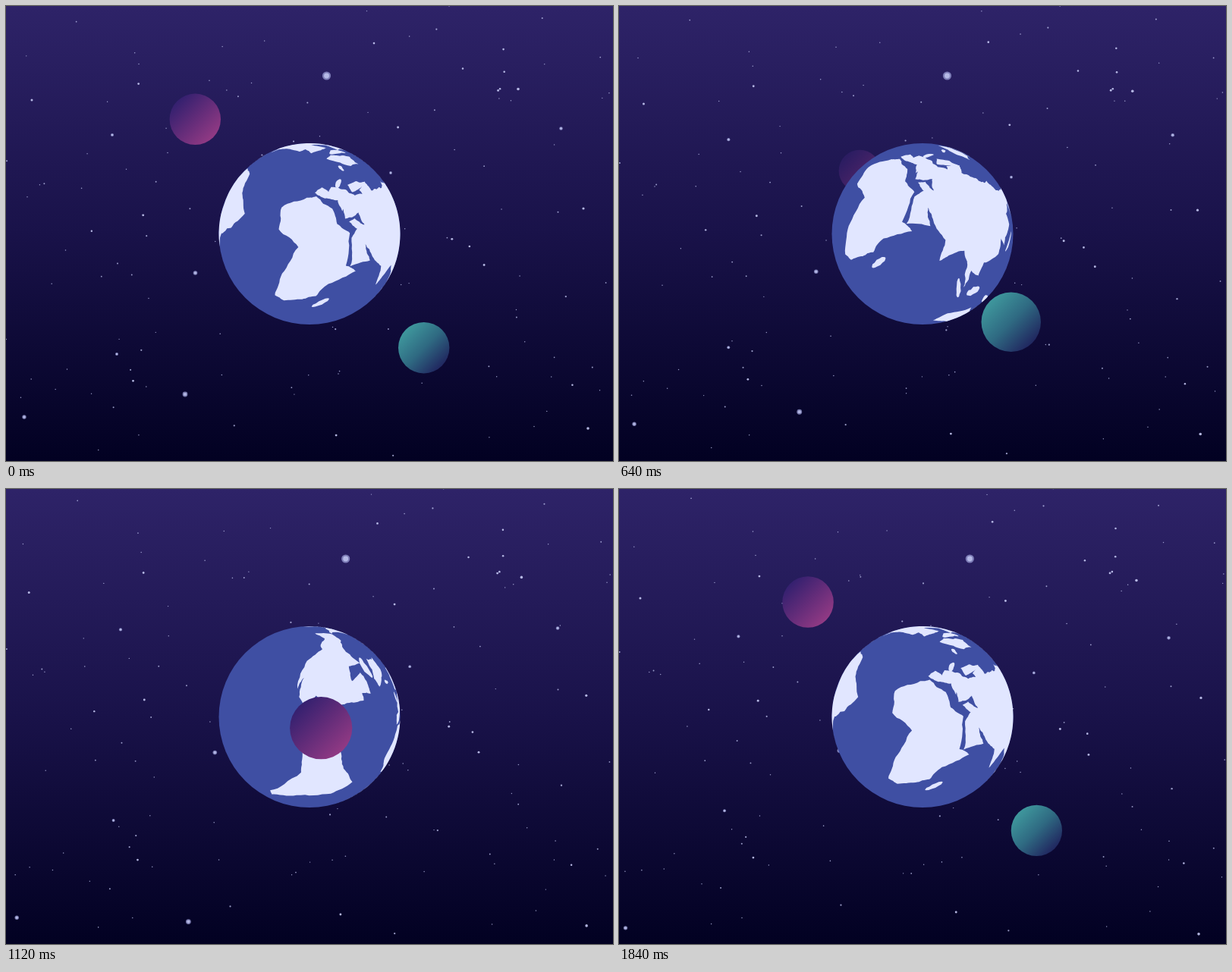
Animation, 800 px wide and 600 px high, one loop 1920 ms. Source, as an HTML page with a canvas:

```html
<!DOCTYPE html>
<html lang="en">
<head>
<meta charset="utf-8">
<title>Planet in orbit</title>
<style>
html, body { margin: 0; width: 100%; height: 100%; overflow: hidden; background: #020122; }
canvas { display: block; }
</style>
</head>
<body>
<canvas id="stage" width="800" height="600"></canvas>
<script>
const ctx = document.getElementById('stage').getContext('2d');
const LOOP = 1920, STEP = 80, CX = 400, CY = 300.5, R = 119.5;
const rad = d => d * Math.PI / 180;
const LEAN = rad(15), ROLL = rad(40), START_LON = 9;

let seed = 7;
const random = () => (seed = seed * 16807 % 2147483647) / 2147483647;
const spread = size => (random() - 0.5) * size;

// Splits an edge again and again, nudging each middle sideways for a ragged coast
function ragged(a, b, level, out) {
  if (!level) return out.push(a);
  const dx = b[0] - a[0], dy = b[1] - a[1], n = spread(0.16) * Math.min(1, 12 / Math.hypot(dx, dy));
  const mid = [(a[0] + b[0]) / 2 - dy * n, (a[1] + b[1]) / 2 + dx * n];
  ragged(a, mid, level - 1, out);
  ragged(mid, b, level - 1, out);
}

const lands = [];

// Corner points as longitude, latitude pairs
function land(...c) {
  const out = [], at = i => c.slice(i % c.length, i % c.length + 2);
  for (let i = 0; i < c.length; i += 2) ragged(at(i), at(i + 2), 3, out);
  lands.push(out);
}

// Centre, half length, half width, tilt
function island(lon, lat, len, wid, tilt) {
  const out = [], cos = Math.cos(rad(tilt)), sin = Math.sin(rad(tilt)), stretch = Math.cos(rad(lat));
  for (let i = 0; i < 16; i++) {
    const u = Math.cos(i * Math.PI / 8) * len, v = Math.sin(i * Math.PI / 8) * wid * (1 + spread(0.5));
    out.push([lon + (u * cos - v * sin) / stretch, lat + u * sin + v * cos]);
  }
  lands.push(out);
}

// Africa
land(-6,36, 10,37, 20,31, 32,31, 42,12, 51,12, 40,-4, 40,-16, 35,-24, 27,-34, 19,-35, 12,-17, 9,4, -8,4, -17,15, -10,31);
// Europe and Asia
land(-9,37, -9,43, -2,44, -4,48, 8,54, 20,55, 28,60, 22,61, 24,66, 16,56, 6,58, 12,66, 26,71, 42,67, 72,73,
  104,77, 130,71, 190,66, 163,59, 157,51, 156,60, 136,55, 140,48, 128,40, 127,35, 121,39, 121,29, 108,21,
  109,12, 101,13, 104,1, 98,9, 94,17, 88,22, 80,14, 77,8, 72,21, 57,26, 48,30, 58,22, 45,13, 35,29, 36,36,
  27,37, 30,41, 41,41, 31,46, 28,41, 23,37, 13,45, 18,40, 9,44, 0,39);
// North America, Greenland
land(-168,66, -150,71, -115,68, -84,69, -94,60, -81,52, -77,62, -65,59, -56,52, -66,49, -62,45, -75,37, -81,31,
  -80,25, -84,30, -97,28, -95,18, -87,21, -83,10, -77,8, -85,11, -105,20, -113,31, -110,23, -124,40, -130,54,
  -150,60, -163,55);
land(-72,78, -33,83, -20,74, -42,60, -52,64, -55,71);
// South America
land(-77,8, -62,10, -50,0, -35,-6, -40,-21, -57,-37, -68,-54, -74,-50, -71,-18, -81,-5);
// Australia
land(114,-22, 130,-12, 140,-17, 142,-11, 153,-27, 148,-38, 131,-32, 115,-34);

island(47, -19, 6.5, 2, 75);
island(-2, 54, 4, 1.6, 110);
island(-19, 65, 2.6, 1.4, 0);
island(138, 37, 8, 1.2, 48);
island(114, 1, 5, 3.5, 45);
island(101, -1, 8, 1.5, -48);
island(141, -5, 10, 2.6, -25);
island(-73, 69, 8, 2.4, -38);
island(173, -41, 7, 1.2, 50);

// Bright stars: x, y, radius, drift x, drift y
const bright = [
  422.5,92,5.6,40,0, 236,512,3.4,7,93, 140,170,2.1,17.5,24.5, 24,542,2.7,-15.5,37, 34,124,1.5,-6,20,
  731.5,161.5,2.3,-7,35, 249.5,352,2.8,41,-7, 675,109.5,1.8,7,11, 507,220,1.9,40,22.5, 761,267,1.6,6,8.5,
  146,459,2,-7,-35, 767,557,1.8,-3,30];
const stars = [];
for (let i = 0; i < bright.length; i += 5) stars.push(bright.slice(i, i + 5));
for (let i = 0; i < 125; i++)
  stars.push([random() * 800, random() * 600, 0.7 + 0.8 * random() ** 3, spread(26), spread(26)]);

// cubic-bezier(x1, 0, x2, 1)
function ease(p, x1, x2) {
  let lo = 0, hi = 1;
  for (let i = 0; i < 24; i++) {
    const s = (lo + hi) / 2, q = 1 - s;
    if (3 * q * q * s * x1 + 3 * q * s * s * x2 + s * s * s < p) lo = s; else hi = s;
  }
  return lo * lo * (3 - 2 * lo);
}

function disc(x, y, r, fill, alpha = 1) {
  ctx.globalAlpha = alpha;
  ctx.fillStyle = fill;
  ctx.beginPath();
  ctx.arc(x, y, r, 0, 2 * Math.PI);
  ctx.fill();
  ctx.globalAlpha = 1;
}

function gradient(x0, y0, x1, y1, ...colors) {
  const g = ctx.createLinearGradient(x0, y0, x1, y1);
  colors.forEach((c, i) => g.addColorStop(i / (colors.length - 1), c));
  return g;
}

function drawStar([x, y, r, dx, dy], k) {
  x += dx * k;
  y += dy * k;
  if (r < 1.9) return disc(x, y, r, '#c6caf4', r < 1.2 ? 0.75 : 0.9);
  disc(x, y, r, '#9a9cd4', 0.75);
  disc(x, y, r * 0.62, '#c3c8f2', 0.8);
}

// Far-side points are pushed out to the rim
function project([lon, lat], lon0) {
  const d = rad(lon - lon0), f = rad(lat);
  const a = Math.cos(f) * Math.sin(d), b = Math.sin(f), c = Math.cos(f) * Math.cos(d);
  const y = b * Math.cos(LEAN) - c * Math.sin(LEAN);
  const z = b * Math.sin(LEAN) + c * Math.cos(LEAN);
  const k = z < 0 ? R / Math.hypot(a, y) : R;
  return {
    x: CX + k * (a * Math.cos(ROLL) + y * Math.sin(ROLL)),
    y: CY + k * (a * Math.sin(ROLL) - y * Math.cos(ROLL)),
    front: z > 0
  };
}

function drawLand(coast, lon0) {
  const points = coast.map(c => project(c, lon0));
  if (!points.some(p => p.front)) return;
  ctx.beginPath();
  points.forEach(p => ctx.lineTo(p.x, p.y));
  ctx.fill();
}

function drawGlobe(lon0) {
  disc(CX, CY, R, '#3f4fa3');
  ctx.fillStyle = '#e1e6ff';
  lands.forEach(coast => drawLand(coast, lon0));
}

// depth > 0 is nearer than the globe
function planet(angle, side, colors) {
  const depth = -side * Math.sin(angle);
  const scale = 1 + depth * (depth > 0 ? 0.22 : 0.25);
  const shift = -side * 150.7 * Math.cos(angle) * scale;
  return { depth, r: 33.7 * scale, x: CX + shift, y: CY - 0.5 + shift, colors };
}

function drawPlanet({ depth, r, x, y, colors }) {
  const e = r * 0.72;
  disc(x, y, r, gradient(x - e, y - e, x + e, y + e, ...colors), depth < 0 ? 1 - 0.9 * depth * depth : 1);
}

function draw(now) {
  const p = Math.floor(now % LOOP / STEP) * STEP / LOOP;
  const turn = ease(p, 0.69, 0.32);
  ctx.fillStyle = gradient(0, 0, 0, 600, '#2e2368', '#191249', '#020122');
  ctx.fillRect(0, 0, 800, 600);
  const drift = (1 - Math.cos(Math.PI * p)) / 2;
  stars.forEach(s => drawStar(s, drift));

  const planets = [
    planet(2 * Math.PI * ease(p, 0.7, 0.3), 1, ['#33206f', '#632c79', '#923a84']),
    planet(2 * Math.PI * turn, -1, ['#3f989d', '#2f6a82', '#20265f'])
  ];
  planets.filter(b => b.depth <= 0).forEach(drawPlanet);
  drawGlobe(START_LON + 360 * turn);
  planets.filter(b => b.depth > 0).forEach(drawPlanet);
}

const begin = performance.now();
function tick() {
  draw(performance.now() - begin);
  requestAnimationFrame(tick);
}
tick();
</script>
</body>
</html>
```
